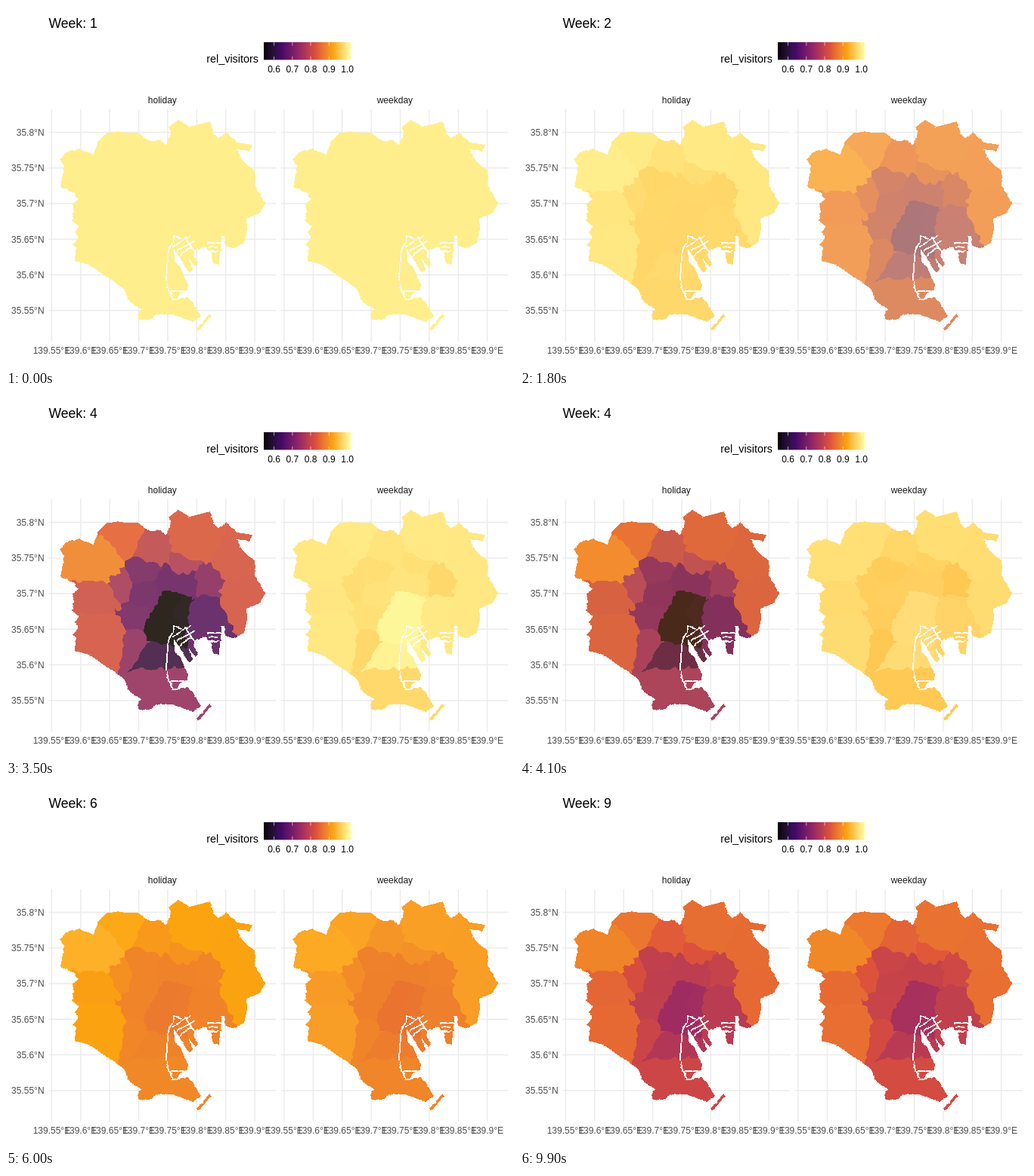
An HTML page with a canvas for the animation above (10000 ms loop, 672 px wide and 480 px high).

```html
<!DOCTYPE html>
<html lang="en">
<head>
<meta charset="utf-8">
<title>Weekly visitors</title>
<style>
  html, body { margin: 0; width: 100%; height: 100%; overflow: hidden; background: #fff; }
  canvas, svg { position: absolute; left: 0; top: 0; width: 672px; height: 480px; }
  text { font-family: "Liberation Sans", Arial, sans-serif; font-size: 12px; }
</style>
</head>
<body>
<canvas id="map" width="672" height="480"></canvas>
<svg id="labels" viewBox="0 0 672 480"></svg>
<script>
const ctx = document.getElementById('map').getContext('2d');
const svg = document.getElementById('labels');
const FRAMES = 100, STEP = 100, WEEKS = 9, PANEL = 307.6;
const MAP = { x: 64, y: 144, w: 288, h: 296 };

// Key points of the coast; noise adds the fine detail
const NORTH = '71 204 79 194 98 190 116 197 121 180 135 167 174 168 191 179 205 178 211 184 219 168 215 161 228 151 243 160 270 153 275 169 281 175 291 168 306 181';
const EAST = '325 184 322 192 305 190 313 205 330 220 329 238 343 262 335 275 318 282 319 296 315 314 300 321 290 318 288 304 285 304 284 324';
const BAY = '267 324 265 319 251 323 247 330 254 343 250 346 241 333 246 349 242 354 228 331 222 322 223 338 230 345 241 370 241 377 231 380 226 389 241 386 258 411 247 419';
const WEST = '224 410 199 409 189 416 176 416 174 410 179 402 163 391 155 374 137 362 110 343 91 338 93 321 88 317 95 308 92 300 97 292 87 286 90 271 89 261 95 256 90 248 72 240 77 212';
const LAND = `M${NORTH} ${EAST} ${BAY} ${WEST}ZM271 327 283 325 282 343 274 341ZM252 428 269 409 272 411 254 431Z`;
const CANALS = 'M222 303 221 312 216 320 214 332 212 362 215 378 242 378M217 378 220 389 227 389' +
  'M222 304 232 309M219 320 245 304M226 325 250 311M236 306 250 326M230 332 246 318M266 314 284 314M268 320 280 320';

// Districts: centre x, y, reach, and how strongly commuters fill it
const DISTRICTS = [
  [250, 186, 30, 0.02], [303, 215, 27, 0.04], [314, 272, 30, 0.05], [200, 390, 34, 0.36],
  [122, 320, 36, 0.05], [118, 268, 28, 0.08], [118, 218, 32, -0.2], [152, 186, 24, -0.05],
  [194, 202, 19, 0.15], [235, 222, 14, 0.22], [265, 293, 27, 0.64], [264, 248, 17, 0.42],
  [242, 249, 14, 0.58], [234, 285, 17, 0.97], [215, 276, 16, 1], [212, 246, 16, 0.58],
  [182, 234, 17, 0.5], [182, 264, 19, 0.55], [148, 252, 18, 0.27], [172, 292, 18, 0.52],
  [168, 328, 18, 0.38], [197, 348, 22, 0.78], [207, 306, 22, 1]
];

// Trend of a week: [base level, drop with commuters, extra dip of the middle ring]
const START = [0.962, 0, 0];
const HOLIDAY = trend([0.955, 0.08, 0.02], [0.95, 0, 0.035], [0.58, 0.57, 0], [0.8, 0.11, 0.04], [0.67, 0.24, 0.035], 0.01);
const WEEKDAY = trend([0.64, 0.37, 0], [0.95, 0, 0.03], [0.955, -0.035, 0.06], [0.77, 0.11, 0.03], [0.68, 0.23, 0.025], 0.1);

// Weeks 7 and 8 lie evenly between 6 and 9; week 5 is week 6 raised a little
function trend(w2, w3, w4, w6, w9, lift) {
  const w5 = [w6[0] + lift, w6[1], w6[2]];
  return [START, w2, w3, w4, w5, w6, blend(w6, w9, 1 / 3), blend(w6, w9, 2 / 3), w9];
}

function level([base, drop, dip], busy) {
  const ring = Math.max(0, 1 - Math.abs(busy - 0.4) / 0.4);
  return base - drop * busy - dip * ring;
}

function mix(a, b, t) { return a + (b - a) * t; }
function blend(a, b, t) { return a.map((v, i) => mix(v, b[i], t)); }

// Lab colour helpers
const lin = v => (v /= 255) > 0.04045 ? ((v + 0.055) / 1.055) ** 2.4 : v / 12.92;
const gam = v => 255 * (v > 0.0031308 ? 1.055 * v ** (1 / 2.4) - 0.055 : 12.92 * v);
const curve = v => v > 0.008856 ? Math.cbrt(v) : 7.787 * v + 16 / 116;
const uncurve = v => v ** 3 > 0.008856 ? v ** 3 : (v - 16 / 116) / 7.787;

function toLab(hex) {
  const n = parseInt(hex, 16);
  const [r, g, b] = [n >> 16, n >> 8 & 255, n & 255].map(lin);
  const x = curve((0.4124 * r + 0.3576 * g + 0.1805 * b) / 0.9505);
  const y = curve(0.2126 * r + 0.7152 * g + 0.0722 * b);
  const z = curve((0.0193 * r + 0.1192 * g + 0.9505 * b) / 1.089);
  return [116 * y - 16, 500 * (x - y), 200 * (y - z)];
}

function toRgb([l, a, b]) {
  const fy = (l + 16) / 116;
  const x = uncurve(fy + a / 500) * 0.9505, y = uncurve(fy), z = uncurve(fy - b / 200) * 1.089;
  return [
    3.2406 * x - 1.5372 * y - 0.4986 * z,
    -0.9689 * x + 1.8758 * y + 0.0415 * z,
    0.0557 * x - 0.204 * y + 1.057 * z
  ].map(v => Math.round(Math.min(255, Math.max(0, gam(v)))));
}

const STOPS = ['000004', '420a68', '932667', 'dd513a', 'fca50a', 'fcffa4'].map(toLab);
function ramp(p) {
  const s = Math.min(4.9999, Math.max(0, p * 5)), i = Math.floor(s);
  return blend(STOPS[i], STOPS[i + 1], s - i);
}

// Smooth seeded noise in -1..1
function hash(x, y, seed) {
  let h = Math.imul(x, 374761393) ^ Math.imul(y, 668265263) ^ Math.imul(seed, 974634533);
  h = Math.imul(h ^ h >>> 13, 1274126177);
  return ((h ^ h >>> 16) >>> 0) / 2 ** 31 - 1;
}
function noise(x, y, seed, size) {
  const u = x / size, v = y / size, i = Math.floor(u), j = Math.floor(v);
  return mix(
    mix(hash(i, j, seed), hash(i + 1, j, seed), u - i),
    mix(hash(i, j + 1, seed), hash(i + 1, j + 1, seed), u - i), v - j);
}

function sheet(w, h) {
  const c = document.createElement('canvas');
  c.width = w;
  c.height = h;
  return c;
}

function landMask() {
  const c = sheet(672, 480).getContext('2d');
  c.fill(new Path2D(LAND));
  c.globalCompositeOperation = 'destination-out';
  c.lineWidth = 2;
  c.stroke(new Path2D(CANALS));
  const { data } = c.getImageData(0, 0, 672, 480);
  return (x, y) => data[(Math.round(y) * 672 + Math.round(x)) * 4 + 3] > 127;
}

// Power diagram: the district with the least d² - r²
function nearest(x, y) {
  let best = 0, least = Infinity;
  DISTRICTS.forEach(([cx, cy, r], i) => {
    const d = (x - cx) ** 2 + (y - cy) ** 2 - r * r;
    if (d < least) { least = d; best = i; }
  });
  return best;
}

function buildOwners() {
  const isLand = landMask(), list = new Int8Array(MAP.w * MAP.h).fill(-1);
  for (let i = 0; i < list.length; i++) {
    const x = MAP.x + i % MAP.w, y = MAP.y + Math.floor(i / MAP.w);
    if (isLand(x + noise(x, y, 1, 4), y + noise(x, y, 2, 4)))
      list[i] = nearest(x + 4 * noise(x, y, 3, 6), y + 4 * noise(x, y, 4, 6));
  }
  return list;
}
const owners = buildOwners();
const mapSheet = sheet(MAP.w, MAP.h), mapCtx = mapSheet.getContext('2d');
const mapImage = mapCtx.createImageData(MAP.w, MAP.h);
const fills = [HOLIDAY, WEEKDAY].map(weeks =>
  DISTRICTS.map(d => weeks.map(w => ramp(level(w, d[3])))));

function label(str, x, y, anchor = 'middle', fill = '#4d4d4d', size) {
  const el = document.createElementNS('http://www.w3.org/2000/svg', 'text');
  el.setAttribute('x', x);
  el.setAttribute('y', y);
  el.setAttribute('text-anchor', anchor);
  el.setAttribute('fill', fill);
  if (size) el.style.fontSize = size + 'px';
  el.textContent = str;
  svg.appendChild(el);
  return el;
}

const gridX = i => 60.4 + i * 38.38;
const gridY = i => 167.5 + i * 47.25;
const tickX = i => 354.5 + i * 24.27;

const title = label('Week: 1', 56.5, 29, 'start', '#000', 17.6);
label('rel_visitors', 334, 75, 'end', '#000', 14.4);
for (let i = 0; i < 5; i++) label((0.6 + i / 10).toFixed(1), tickX(i), 87.6, 'middle', '#000');
['holiday', 'weekday'].forEach((name, p) => {
  label(name, 206.8 + p * PANEL, 129, 'middle', '#1a1a1a');
  for (let i = 0; i < 8; i++)
    label(+(139.55 + i * 0.05).toFixed(2) + '°E', gridX(i) + p * PANEL, 461);
});
for (let i = 0; i < 6; i++) label(+(35.8 - i * 0.05).toFixed(2) + '°N', 50.6, gridY(i) + 4.3, 'end');

function line(x1, y1, x2, y2) {
  ctx.beginPath();
  ctx.moveTo(x1, y1);
  ctx.lineTo(x2, y2);
  ctx.stroke();
}

function drawLegend() {
  for (let i = 0; i < 115; i++) {
    ctx.fillStyle = `rgb(${toRgb(ramp((i + 0.5) / 115))})`;
    ctx.fillRect(341 + i, 48, 1, 23.4);
  }
  ctx.strokeStyle = 'rgba(255,255,255,0.6)';
  ctx.lineWidth = 1;
  for (let i = 0; i < 5; i++) {
    line(tickX(i), 48, tickX(i), 52.6);
    line(tickX(i), 66.8, tickX(i), 71.4);
  }
}

function drawPanel(p, key, t) {
  const left = p * PANEL;
  ctx.strokeStyle = '#ebebeb';
  ctx.lineWidth = 1.42;
  for (let i = 0; i < 8; i++) line(gridX(i) + left, 137, gridX(i) + left, 445);
  for (let i = 0; i < 6; i++) line(56.5 + left, gridY(i), 357 + left, gridY(i));

  const colors = fills[p].map(weeks => toRgb(blend(weeks[key], weeks[key + 1], t)));
  owners.forEach((id, i) => {
    if (id >= 0) mapImage.data.set([...colors[id], 255], i * 4);
  });
  mapCtx.putImageData(mapImage, 0, 0);
  ctx.drawImage(mapSheet, MAP.x + Math.round(left), MAP.y);
}

// Each week is reached on a whole frame; halves go to the even one
const keyFrame = k => Math.round(k * (FRAMES - 1) / (WEEKS - 1));

function draw(frame) {
  let key = 0;
  while (key < WEEKS - 2 && frame >= keyFrame(key + 1)) key++;
  const from = keyFrame(key), t = (frame - from) / (keyFrame(key + 1) - from);
  ctx.fillStyle = '#fff';
  ctx.fillRect(0, 0, 672, 480);
  drawLegend();
  drawPanel(0, key, t);
  drawPanel(1, key, t);
  title.textContent = 'Week: ' + Math.round(1 + (WEEKS - 1) * frame / (FRAMES - 1));
}

let last = -1;
function tick() {
  const frame = Math.floor(performance.now() / STEP) % FRAMES;
  if (frame !== last) draw(last = frame);
  requestAnimationFrame(tick);
}
tick();
</script>
</body>
</html>
```
